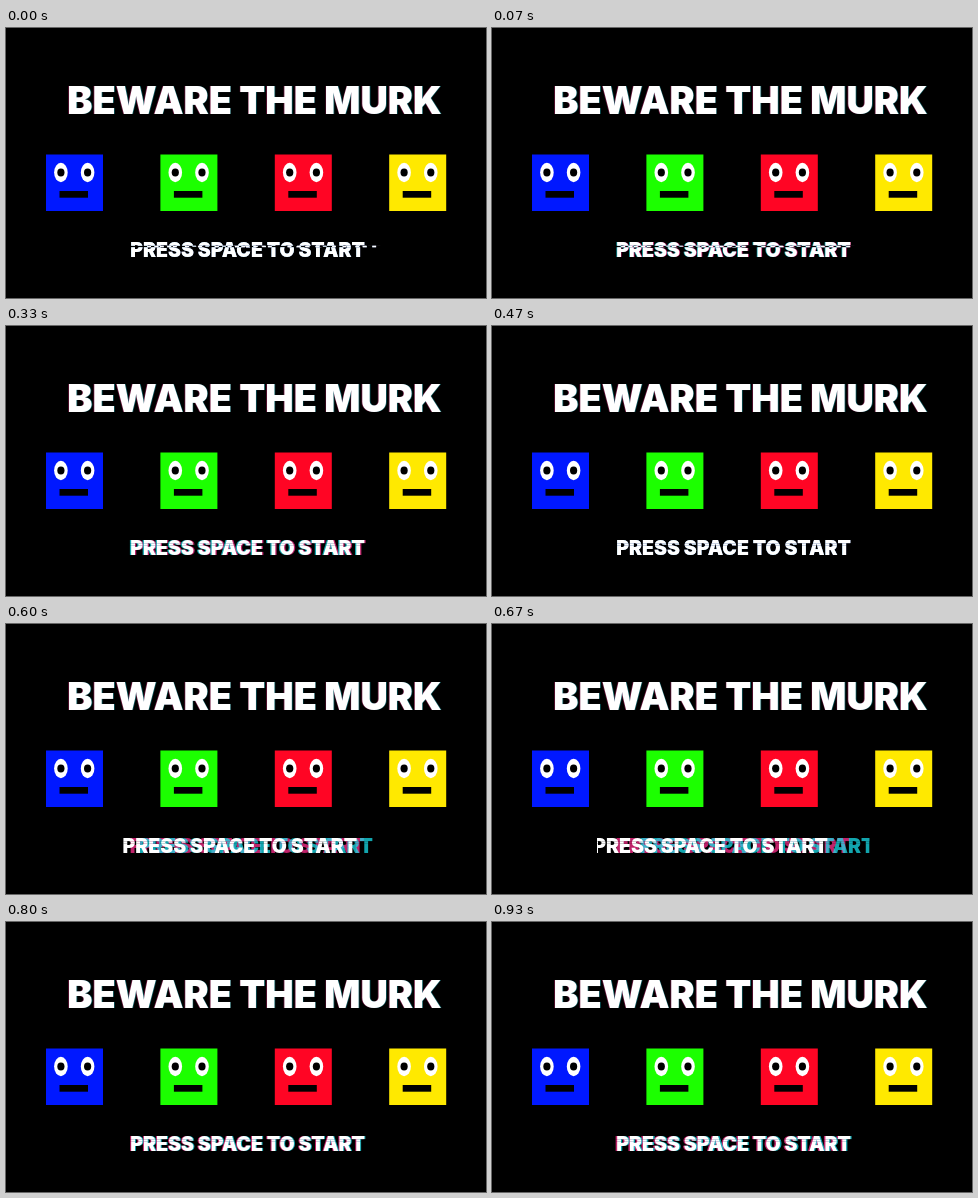
These frames come from a looping animation (480x270 px, 990 ms). An HTML page:

```html
<!DOCTYPE html>
<html lang="en">
<head>
<meta charset="utf-8">
<title>Title screen</title>
<style>
  html, body { margin: 0; width: 100%; height: 100%; overflow: hidden; background: #000; }
  svg { display: block; width: 480px; height: 270px; }
  text { font-family: Inter, "Open Sans", sans-serif; font-weight: 900; text-anchor: middle; }
  .title { font-size: 37.8px; }
  .prompt { font-size: 19.5px; }
  .pink { fill: #ff2f8e; }
  .cyan { fill: #18dce8; }
  .white { fill: #fff; }
</style>
</head>
<body>
<svg viewBox="0 0 480 270">
  <defs>
    <text id="title" class="title" x="248.5" y="86">BEWARE THE MURK</text>
    <text id="prompt" class="prompt" x="241.5" y="228.8">PRESS SPACE TO START</text>
    <g id="eye">
      <ellipse rx="6.8" ry="9.7" fill="#fff"/>
      <ellipse rx="3.6" ry="4" fill="#000"/>
    </g>
    <g id="face">
      <rect width="57" height="56.5"/>
      <use href="#eye" x="14.9" y="18"/>
      <use href="#eye" x="41.6" y="18"/>
      <rect x="13.5" y="36.5" width="28.5" height="6.7" fill="#000"/>
    </g>
    <clipPath id="body"><path d="M105 205H377.5V217.8H105ZM105 219.2H377.5V240H105Z"/></clipPath>
    <clipPath id="band"><path d="M105 217.8H377.5V219.2H105Z"/></clipPath>
  </defs>
  <rect width="480" height="270"/>
  <use href="#title" class="pink" x="-0.7" opacity=".4"/>
  <use href="#title" class="cyan" x="0.7" opacity=".4"/>
  <use href="#title" class="white"/>
  <g id="faces"></g>
  <g id="text"></g>
</svg>
<script>
const NS = "http://www.w3.org/2000/svg";
const LOOP = 990;
const FPS = 15;

function add(parent, tag, attrs) {
  const el = document.createElementNS(NS, tag);
  for (const key in attrs) el.setAttribute(key, attrs[key]);
  return parent.appendChild(el);
}

const faces = document.getElementById("faces");
["#0018ff", "#1cff00", "#ff0524", "#ffe900"].forEach((fill, i) =>
  add(faces, "use", { href: "#face", x: 40 + i * 114.4, y: 126.5, fill }));

const text = document.getElementById("text");
const layers = ["body", "band"].map(clip => {
  const group = add(text, "g", { "clip-path": `url(#${clip})` });
  return ["pink", "cyan", "white"].map(name =>
    add(group, "use", { href: "#prompt", class: name, opacity: name === "white" ? 1 : 0.75 }));
});

function draw(now) {
  // steps start on times rounded to 10 ms
  const k = Math.floor((now % LOOP + 3.4) * FPS / 1000);
  // colour split swells and fades, then grows the other way
  const split = k < 7 ? 1.6 * Math.sin(Math.PI * k / 7) : 0.2 * (7 - k);
  // one sideways jump, and a torn line that settles
  const jump = 23 * Math.max(0, 1 - Math.abs(k - 10) / 1.5);
  const tear = 16 * 4 ** -k;

  layers.forEach((layer, i) =>
    [split, jump - split, -jump].forEach((dx, j) =>
      layer[j].setAttribute("x", dx + i * tear)));
}

function tick() {
  draw(performance.now());
  requestAnimationFrame(tick);
}
tick();
</script>
</body>
</html>
```
